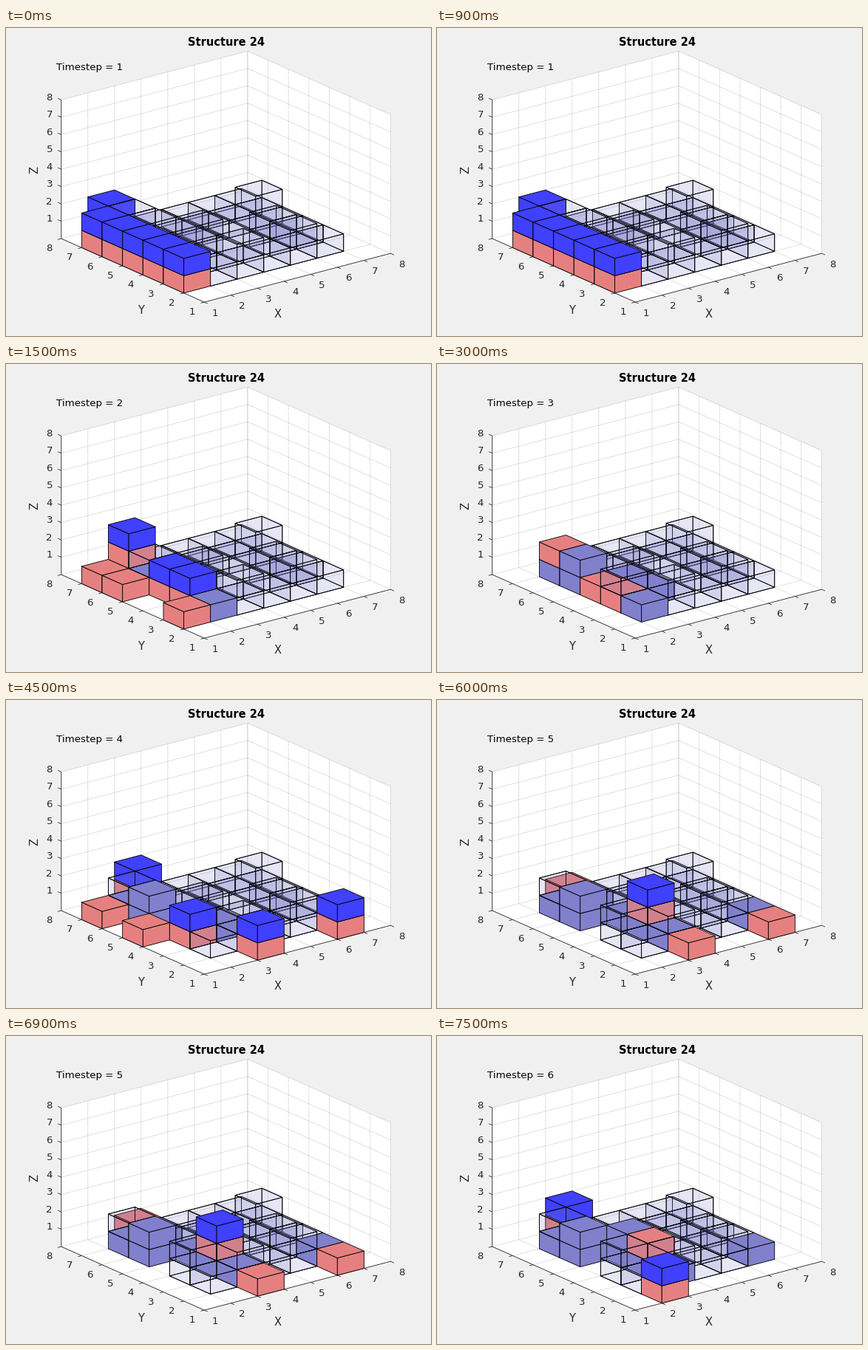
These frames come from a looping animation (575 px wide and 417 px high, 8 s). A matplotlib script:

```python
from collections import Counter

import numpy as np
import matplotlib.pyplot as plt
from matplotlib.animation import FuncAnimation
from matplotlib.collections import LineCollection, PolyCollection

W, H, DPI = 575, 417, 100
STEP_MS, TICK_MS, LOOP_MS = 1500, 500, 8000

plt.rcParams["font.family"] = "DejaVu Sans"

# Orthographic view, stretched to fill the axes box
AZ, EL = np.radians(37.5), np.radians(30)
BOX_L, BOX_T = 0.13 * W, 0.075 * H
BOX_W, BOX_H = 0.775 * W, 0.815 * H
COS, SIN = np.cos(AZ), np.sin(AZ)
SX = BOX_W / (COS + SIN)
SY = BOX_H / ((COS + SIN) * np.sin(EL) + np.cos(EL))
UX = np.array([COS * SX, -SIN * np.sin(EL) * SY]) / 7
UY = np.array([-SIN * SX, -COS * np.sin(EL) * SY]) / 7
UZ = np.array([0, -np.cos(EL) * SY]) / 8
ORIGIN = np.array([BOX_L + SIN * SX, BOX_T + BOX_H])

BLUE = (0.25, 0.25, 1, 1)
RED = (0.9, 0.5, 0.5, 1)
PLACED = (0.5, 0.5, 0.8, 1)
GHOST = (0.5, 0.5, 0.8, 0.1)
INK = (0.15, 0.15, 0.15)


def project(x, y, z=0):
    return ORIGIN + (x - 1) * UX + (y - 1) * UY + z * UZ


# Planned structure: a square base with gaps and some two-high columns
GAPS = {(2, 4), (4, 3), (4, 4)}
TALL = {(2, 3), (2, 5), (2, 6), (3, 2), (3, 4), (5, 2), (5, 3), (6, 5)}
PLAN = {(x, y, 0) for x in range(2, 7) for y in range(2, 7)
        if (x, y) not in GAPS} | {(x, y, 1) for x, y in TALL}

# Blocks added to and taken from columns at each step
ADDED = {1: [(2, 6), (2, 5), (2, 2)],
         2: [(2, 5), (3, 4), (3, 3)],
         4: [(3, 6), (3, 2), (6, 2)],
         5: [(3, 4)]}
TAKEN = {3: [(2, 2)], 5: [(3, 6)]}

# Columns of the loaded and the empty robots at each step
BUILDERS = [(2, 6), (2, 4), (2, 3)]
LOADED = [[(1, y) for y in range(2, 7)] + [(2, 7)],
          BUILDERS,
          [],
          [(3, 7), (2, 3), (3, 1), (6, 1)],
          [(3, 3)],
          [(3, 7), (2, 1)]]
EMPTY = [[],
         [(1, 6), (1, 5), (1, 2)],
         BUILDERS,
         [(1, 6), (1, 4)],
         [(3, 7), (3, 1), (6, 1)],
         [(3, 3)]]


def paint_cells(step):
    height = Counter()
    for s in range(step + 1):
        height.update(ADDED.get(s, []))
        height.subtract(TAKEN.get(s, []))
    colors = dict.fromkeys(PLAN, GHOST)
    for (x, y), n in height.items():
        colors.update({(x, y, z): PLACED for z in range(n)})
    for x, y in LOADED[step] + EMPTY[step]:
        colors[x, y, height[x, y]] = RED
    for x, y in LOADED[step]:
        colors[x, y, height[x, y] + 1] = BLUE
    return colors


def cube_faces(cell):
    """Six faces: the three hidden ones first, then left, right and top."""
    def face(axis, side):
        quad = []
        for pair in [(0, 0), (1, 0), (1, 1), (0, 1)]:
            corner = np.insert(pair, axis, side) + cell
            quad.append(project(*corner))
        return quad

    return [face(axis, side) for axis, side in
            [(2, 0), (0, 1), (1, 1), (0, 0), (1, 0), (2, 1)]]


def scene(step):
    colors = paint_cells(step)
    faces, fills = [], []
    for cell in sorted(colors, key=lambda c: (c[2] - c[0] - c[1], c)):
        quads = cube_faces(cell)
        if colors[cell] != GHOST:
            quads = quads[3:]
        faces += quads
        fills += [colors[cell]] * len(quads)
    return faces, fills


def px(size):
    return size * 72 / DPI


fig = plt.figure(figsize=(W / DPI, H / DPI), dpi=DPI, facecolor=(0.94,) * 3)
ax = fig.add_axes([0, 0, 1, 1])
ax.set(xlim=(0, W), ylim=(H, 0))
ax.axis("off")


def lines(segments, color, width, z):
    ax.add_collection(LineCollection(segments, colors=[color],
                                     linewidths=px(width), zorder=z))


def label(x, y, text, size=13.33, **kw):
    return ax.text(x, y, text, fontsize=px(size), zorder=5, **kw)


def draw_axes():
    outline = [project(1, 1), project(8, 1), project(8, 1, 8),
               project(8, 8, 8), project(1, 8, 8), project(1, 8)]
    ax.add_collection(PolyCollection([outline], facecolors="white",
                                     edgecolors="none"))
    grid, ticks = [], []
    out_x = -UY / np.hypot(*UY) * 5
    out_y = -UX / np.hypot(*UX) * 5
    for t in range(1, 9):
        grid += [[project(t, 1), project(t, 8), project(t, 8, 8)],
                 [project(1, t), project(8, t), project(8, t, 8)],
                 [project(1, 8, t), project(8, 8, t), project(8, 1, t)]]
        for base, out, (dx, dy) in [(project(t, 1), out_x, (15, 18.5)),
                                    (project(1, t), out_y, (-16.5, 17)),
                                    (project(1, 8, t), -out_x, (-16, 0.5))]:
            ticks.append([base, base + out])
            label(base[0] + dx, base[1] + dy, str(t), color=INK, ha="center")
    lines(grid, INK + (0.15,), 0.9, 1.5)
    lines(ticks + [[project(8, 1), project(1, 1), project(1, 8),
                    project(1, 8, 8)]], INK, 0.8, 2)
    label(368, 392, "X", 14.67, color=INK, ha="center")
    label(182.5, 387, "Y", 14.67, color=INK, ha="center")
    label(46, 191.5, "Z", 14.67, color=INK, ha="right", va="center", rotation=90)
    label(297.5, 24, "Structure 24", 14.67, weight="bold", ha="center")


draw_axes()
cubes = PolyCollection([], edgecolors="black", linewidths=px(0.85),
                       joinstyle="round", zorder=3)
ax.add_collection(cubes)
caption = label(68, 57, "")


def update(frame):
    step = frame * TICK_MS // STEP_MS
    faces, fills = scene(step)
    cubes.set_verts(faces)
    cubes.set_facecolor(fills)
    caption.set_text(f"Timestep = {step + 1}")
    return cubes, caption


anim = FuncAnimation(fig, update, frames=LOOP_MS // TICK_MS, interval=TICK_MS,
                     init_func=lambda: update(0), repeat=True, repeat_delay=0)
plt.show()
```
